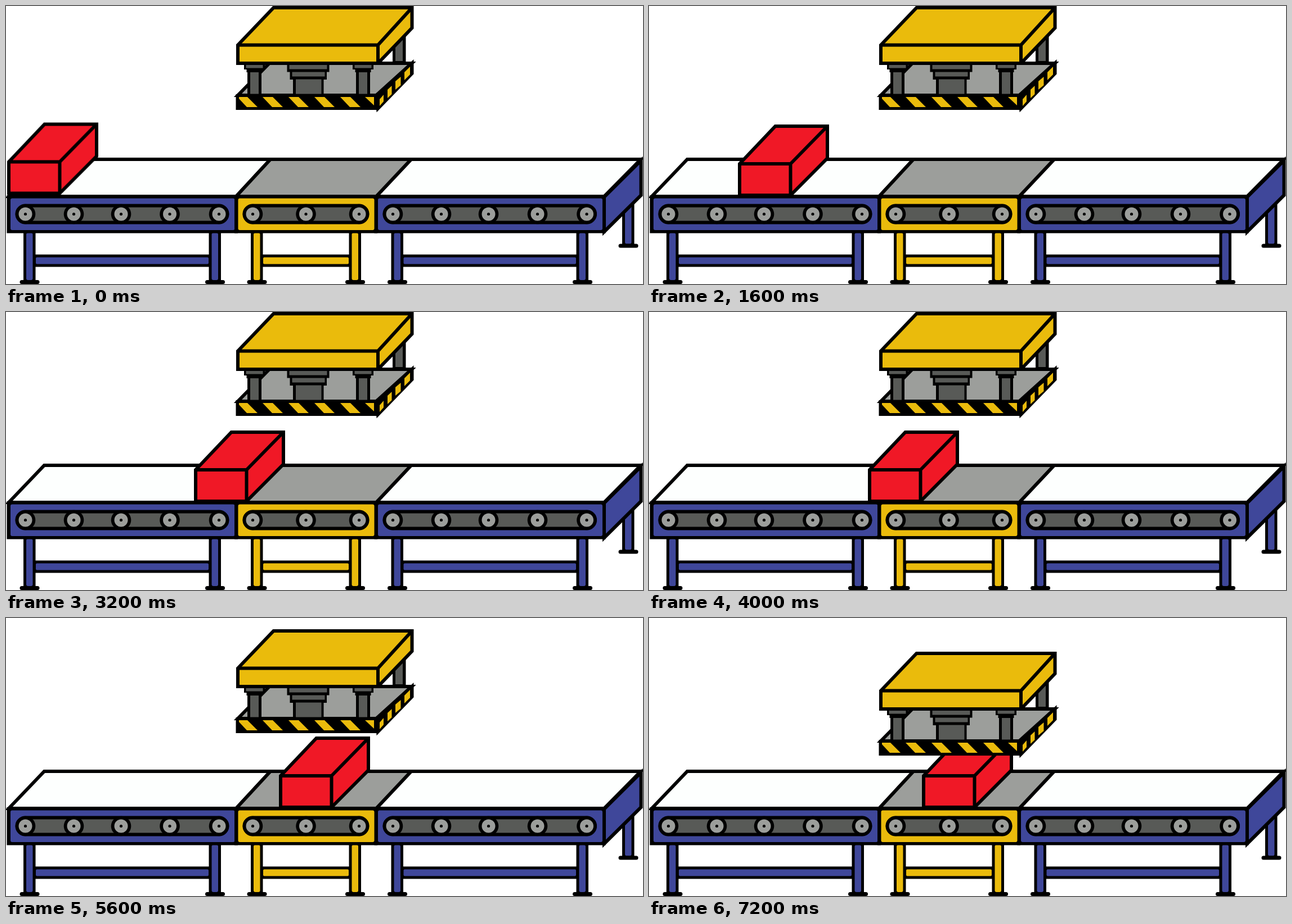
An HTML page that plays this animation: 1132 by 495 pixels, repeating every 8000 ms.

```html
<!DOCTYPE html>
<html lang="en">
<head>
<meta charset="utf-8">
<title>Conveyor press</title>
<style>
  html, body { margin: 0; width: 100%; height: 100%; overflow: hidden; background: #fff; }
  svg { display: block; width: 100%; height: 100%; }
  .line { stroke: #000; stroke-width: 6; stroke-linejoin: miter; }
  .foot { stroke: #000; stroke-width: 7; stroke-linecap: round; }
  .blue { fill: #3f479a; }
  .gold { fill: #eabb0c; }
  .red { fill: #f01826; }
  .dark { fill: #585a57; }
  .grey { fill: #9c9e9b; }
  .belt { fill: #fdfffe; }
</style>
</head>
<body>
<svg viewBox="0 0 1132 495">
  <g id="table"></g>
  <g id="box">
    <path class="line red" d="M161 281L224.500 214H317V271L251.500 337H161Z"/>
    <path class="line" fill="none" d="M161 281H251.500V337M251.500 281L317 214"/>
  </g>
  <g id="press"></g>
</svg>
<script>
const NS = 'http://www.w3.org/2000/svg';
const table = document.getElementById('table');
const press = document.getElementById('press');

function add(parent, tag, cls, attrs) {
  const el = document.createElementNS(NS, tag);
  if (cls) el.setAttribute('class', cls);
  for (const k in attrs) el.setAttribute(k, attrs[k]);
  parent.appendChild(el);
  return el;
}
const path = (parent, cls, d) => add(parent, 'path', cls, { d });
const rect = (parent, cls, x1, y1, x2, y2, rx = 0) =>
  add(parent, 'rect', cls, { x: x1, y: y1, width: x2 - x1, height: y2 - y1, rx });

// Black block with a coloured, slightly rounded inside.
function block(parent, cls, x1, y1, x2, y2, edge = 5) {
  rect(parent, '', x1, y1, x2, y2);
  rect(parent, cls, x1 + edge, y1 + edge, x2 - edge, y2 - edge, 2);
}

function leg(cls, x, top, bottom) {
  rect(table, '', x, top, x + 21.5, bottom);
  rect(table, cls, x + 5, top + 2, x + 16.5, bottom - 2, 3);
  path(table, 'foot', `M${x - 3} ${bottom + 1.5}H${x + 25}`);
}

function section(cls, x1, x2, legs, rollers) {
  block(table, cls, legs[0] + 17, 442.5, legs[1] + 4.5, 464.5);
  legs.forEach(x => leg(cls, x, 402, 490));
  rect(table, '', x1 - 3, 337, x2 + 3, 404.5);
  rect(table, cls, x1 + 3.5, 342.5, x2 - 2.5, 399, 3);
  const first = rollers[0], last = rollers[rollers.length - 1];
  rect(table, 'line dark', first - 15, 355.5, last + 15, 385.5, 15);
  for (const cx of rollers) {
    add(table, 'circle', '', { cx, cy: 370.5, r: 17.8 });
    add(table, 'circle', 'grey', { cx, cy: 370.5, r: 12 });
    add(table, 'circle', '', { cx, cy: 370.5, r: 2.6 });
  }
}

function drawTable() {
  leg('blue', 1095, 345, 425.5);
  path(table, 'line blue', 'M1063 340L1128.500 275V337L1063 402Z');
  path(table, 'line belt', 'M5 339L68 273H470L409 339Z');
  path(table, 'line belt', 'M658 339L720 273H1128L1063 339Z');
  path(table, 'line grey', 'M409 339L470 273H720L658 339Z');
  section('blue', 4.5, 409, [31, 360.5], [34.5, 120.5, 204.5, 291, 378.5]);
  section('blue', 657.5, 1062.500, [684.5, 1013.500], [687.5, 773.5, 857.5, 944.5, 1032]);
  section('gold', 409, 657, [435, 609.5], [438.5, 533, 627.5]);
}

function column(cx) {
  rect(press, '', cx - 18.5, 101, cx + 18.5, 113);
  rect(press, '', cx - 14, 110, cx + 14, 118);
  rect(press, 'dark', cx - 15, 104.5, cx + 15, 110.5);
  rect(press, '', cx - 12.5, 116, cx + 12.5, 160);
  rect(press, 'dark', cx - 7.5, 118, cx + 7.5, 156.5);
}

function drawPress() {
  // lower plate
  path(press, 'line grey', 'M412 159L468 102H721L658 159Z');
  path(press, 'line', 'M659 160L721.500 102V120L661 182.500Z');
  rect(press, '', 408.5, 157, 663, 185);
  for (const x of [411, 456, 502, 548, 594, 639]) {
    const l = Math.max(x, 414);
    path(press, 'gold', x < 630
      ? `M${l} 162H${x + 18}L${x + 36} 180H${x + 17}L${l} ${162 + l - x}Z`
      : `M${x - 1} 162H654V177Z`);
  }
  const side = [[664, 166, 671, 158, 12], [678, 149, 685.5, 142, 15],
                [692, 134, 701.5, 126, 15], [708, 118, 718, 108, 14]];
  for (const [x1, y1, x2, y2, h] of side)
    path(press, 'gold', `M${x1} ${y1}L${x2} ${y2}v${h}L${x1} ${y1 + h}Z`);

  // pistons
  rect(press, '', 687, 45, 710.5, 101);
  rect(press, 'dark', 692, 45, 705, 98);
  column(441.5);
  column(634.5);
  rect(press, '', 499.5, 101, 574.5, 117.5);
  rect(press, '', 504.5, 113, 570, 131);
  rect(press, '', 510, 128, 564.5, 160);
  rect(press, 'dark', 503.5, 104.5, 570.5, 112.5);
  rect(press, 'dark', 508.5, 117.5, 566.5, 125.5);
  rect(press, 'dark', 515, 130.5, 560.5, 156.5);

  // upper plate
  path(press, 'line gold', 'M412 69.500L475.500 3H721.500V39L661 102H412Z');
  path(press, 'line', 'M661 69.500V102').setAttribute('fill', 'none');
  path(press, 'line', 'M412 69.500H661L721.500 3').setAttribute('fill', 'none');
}

// Hard steps of equal length: one [x, y] shift per step.
function play(el, shifts) {
  const frames = shifts.map(([x, y], i) => ({
    offset: i / shifts.length,
    transform: `translate(${x}px, ${y}px)`,
    easing: 'step-end'
  }));
  frames.push({ ...frames[frames.length - 1], offset: 1 });
  el.animate(frames, { duration: 8000, iterations: Infinity });
}

drawTable();
drawPress();
const boxX = [-156, -81, 0, 87, 176, 231, 327, 327, 327, 327];
const pressY = [0, 0, 0, 0, 0, 0, 0, 20, 40, 60];
play(document.getElementById('box'), boxX.map((x, i) => [x, i ? 0 : -3.5]));
play(press, pressY.map(y => [0, y]));
</script>
</body>
</html>
```
